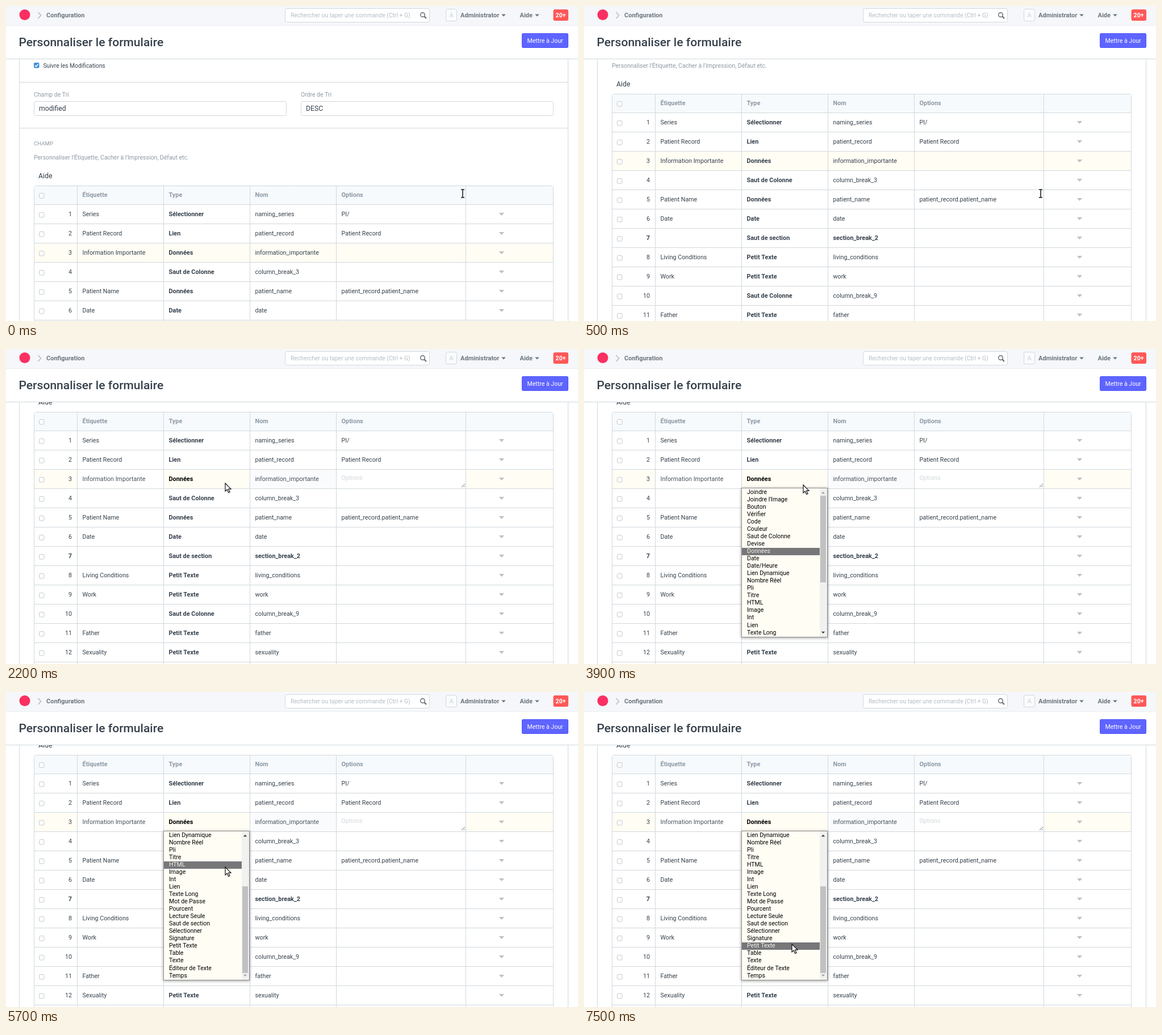
An HTML page with a canvas for the animation above (8000 ms loop, 1007 px wide and 556 px high).

```html
<!DOCTYPE html>
<html lang="fr">
<head>
<meta charset="utf-8">
<title>Personnaliser le formulaire</title>
<style>
html, body { margin: 0; width: 100%; height: 100%; overflow: hidden; background: #fff; }
canvas { display: block; width: 1007px; height: 556px; }
</style>
</head>
<body>
<canvas id="stage" width="1007" height="556"></canvas>
<script>
const ctx = document.getElementById('stage').getContext('2d');
const LOOP = 8000, STEP = 100;
const LINE = '#d1d8dd', MUTED = '#8d99a6', INK = '#36414c', CREAM = '#fffdf4', PALE = '#f7fafc';
const ROW_H = 34, PAGE_SCROLL = 206;
const ITEM_H = 13.05, LIST_TOP = 246.6, VISIBLE = 20;

// label, type, name, options
const rows = [
  ['Series', 'Sélectionner', 'naming_series', 'PI/'],
  ['Patient Record', 'Lien', 'patient_record', 'Patient Record'],
  ['Information Importante', 'Données', 'information_importante', ''],
  ['', 'Saut de Colonne', 'column_break_3', ''],
  ['Patient Name', 'Données', 'patient_name', 'patient_record.patient_name'],
  ['Date', 'Date', 'date', ''],
  ['', 'Saut de section', 'section_break_2', ''],
  ['Living Conditions', 'Petit Texte', 'living_conditions', ''],
  ['Work', 'Petit Texte', 'work', ''],
  ['', 'Saut de Colonne', 'column_break_9', ''],
  ['Father', 'Petit Texte', 'father', ''],
  ['Sexuality', 'Petit Texte', 'sexuality', ''],
  ['', '', '', '']
];
const EDITED = 2, SECTION = 6;
const textX = [134.5, 286.5, 438.5, 590.5];
const dividers = [125, 277, 429, 581, 809];

const items = ['Joindre', "Joindre l'Image", 'Bouton', 'Vérifier', 'Code', 'Couleur',
  'Saut de Colonne', 'Devise', 'Données', 'Date', 'Date/Heure', 'Lien Dynamique', 'Nombre Réel',
  'Pli', 'Titre', 'HTML', 'Image', 'Int', 'Lien', 'Texte Long', 'Mot de Passe', 'Pourcent',
  'Lecture Seule', 'Saut de section', 'Sélectionner', 'Signature', 'Petit Texte', 'Table',
  'Texte', 'Éditeur de Texte', 'Temps'];
const SELECTED = items.indexOf('Données');
const LIST_SCROLL = (items.length - VISIBLE) * ITEM_H;

// time, x, y of the pointer tip
const pointerPath = [
  [900, 804, 328], [1900, 386, 237], [3820, 386, 237], [4500, 386, 309],
  [6300, 386, 309], [7200, 368, 439], [7500, 366, 445]
];

const clamp = v => Math.min(1, Math.max(0, v));
const progress = (t, from, to) => clamp((t - from) / (to - from));
const easeOut = (p, power) => 1 - Math.pow(1 - p, power);
const smooth = p => p * p * (3 - 2 * p);

function rect(x, y, w, h, color) {
  ctx.fillStyle = color;
  ctx.fillRect(x, y, w, h);
}

function box(x, y, w, h, r, fill, stroke) {
  ctx.beginPath();
  ctx.roundRect(x, y, w, h, r);
  if (fill) { ctx.fillStyle = fill; ctx.fill(); }
  if (stroke) { ctx.lineWidth = 1; ctx.strokeStyle = stroke; ctx.stroke(); }
}

function text(str, x, y, size, color, weight = 400, align = 'left') {
  ctx.font = `${weight} ${size}px Roboto, "Noto Sans", sans-serif`;
  ctx.textAlign = align;
  ctx.fillStyle = color;
  ctx.fillText(str, x, y);
}

function polygon(points, fill) {
  ctx.beginPath();
  points.forEach(([x, y]) => ctx.lineTo(x, y));
  ctx.closePath();
  ctx.fillStyle = fill;
  ctx.fill();
}

function polyline(points, color, width) {
  ctx.beginPath();
  points.forEach(([x, y]) => ctx.lineTo(x, y));
  ctx.lineWidth = width;
  ctx.strokeStyle = color;
  ctx.stroke();
}

// A flat triangle; a negative height points up.
function caret(x, y, half, height, color) {
  polygon([[x - half, y - height / 2], [x + half, y - height / 2], [x, y + height / 2]], color);
}

function drawNavbar() {
  rect(0, 0, 1007, 34, '#f5f7fa');
  rect(0, 34, 1007, 1, '#ebeff2');
  ctx.beginPath();
  ctx.arc(33, 15.5, 9.5, 0, Math.PI * 2);
  ctx.fillStyle = '#fb2f62';
  ctx.fill();
  polyline([[56.5, 11], [61.5, 16.5], [56.5, 22]], '#b4bec8', 1.6);
  text('Configuration', 71, 20, 11, '#6c7680', 700);

  box(491.5, 4.5, 254, 24, 3, '#fff', LINE);
  text('Rechercher ou taper une commande (Ctrl + G)', 501, 20, 10.35, '#b5bdc5');
  ctx.beginPath();
  ctx.arc(733.5, 15.5, 3.8, 0, Math.PI * 2);
  ctx.lineWidth = 1.4;
  ctx.strokeStyle = '#5f6972';
  ctx.stroke();
  polyline([[736.2, 18.2], [740, 22]], '#5f6972', 2);

  box(774.5, 5.5, 19, 21, 3, '#fafbfc', LINE);
  text('A', 784, 20, 11, '#c9d1d8', 400, 'center');
  text('Administrator', 800, 20, 11.05, '#6c7680', 700);
  caret(876, 16.5, 3.8, 4, '#6c7680');
  text('Aide', 904.5, 20, 11.05, '#6c7680', 700);
  caret(935, 16.5, 3.8, 4, '#6c7680');
  box(963.5, 6, 26.5, 20, 3, '#ff5858');
  text('20+', 976.5, 20, 10.5, '#fff', 700, 'center');
}

function drawPageHead() {
  rect(0, 35, 1007, 58, '#fff');
  rect(0, 93, 1007, 1, LINE);
  text('Personnaliser le formulaire', 22.5, 70.5, 21.05, INK, 500);
  box(908, 48, 82, 26, 3, '#5e64ff');
  box(908.5, 48.5, 81, 25, 3, null, '#5057ff');
  text('Mettre à Jour', 949, 65, 10.6, '#fff', 400, 'center');
}

function checkbox(y) {
  box(58.5, y - 4.5, 8.5, 8.5, 2, '#fff', '#c3c8cc');
}

function drawEditedCells(top) {
  [[125, 277, '#fff'], [429, 581, '#fafbfc'], [581, 809, '#fff']].forEach(([left, right, color]) =>
    rect(left + 1, top + 1, right - left - 1, ROW_H - 1, color));
  polyline([[802, top + 32], [808, top + 26]], '#777', 1);
  polyline([[805.5, top + 32], [808, top + 29.5]], '#777', 1);
}

function drawRow(row, i, editing) {
  const top = 350 + i * ROW_H, base = top + 21;
  const active = editing && i === EDITED;
  const weight = i === SECTION ? 700 : 400;
  const size = i === SECTION ? 10.9 : 10.7;
  if (i === EDITED) rect(50, top + 1, 913, ROW_H - 1, CREAM);
  if (active) drawEditedCells(top);
  rect(50, top, 913, 1, LINE);
  checkbox(top + 19);
  text(i + 1, 116, base, size, INK, weight, 'right');
  row.forEach((cell, col) => {
    if (col === 1) text(cell, textX[col], base, 10.9, active ? '#000' : INK, 700);
    else text(cell, textX[col], base, size, active ? '#47525d' : INK, weight);
  });
  if (active) text('Options', textX[3], base - 2, 10.7, '#d1d8dd');
  caret(872.5, top + 17.5, 4.7, 5, '#bcc0c4');
}

function drawTable(editing) {
  box(49.5, 317.5, 914, 600, 3, '#fff', LINE);
  rect(50, 318, 913, 32, PALE);
  checkbox(335);
  ['Étiquette', 'Type', 'Nom', 'Options'].forEach((label, i) =>
    text(label, textX[i], 337, 10.9, MUTED, 700));
  rows.forEach((row, i) => drawRow(row, i, editing));
  dividers.forEach(x => rect(x, 318, 1, 600, LINE));
}

function drawForm(scroll, editing) {
  ctx.save();
  ctx.beginPath();
  ctx.rect(0, 94, 1007, 462);
  ctx.clip();
  rect(23, 94, 1, 462, LINE);
  rect(989, 94, 1, 462, LINE);
  ctx.translate(0, -scroll);

  box(49, 100, 9.5, 9.5, 2, '#3b8fdd');
  polyline([[51, 104.8], [53, 107], [56.5, 102.5]], '#fff', 1.5);
  text('Suivre les Modifications', 65.5, 109, 10.3, INK);
  rect(24, 134, 965, 1, LINE);
  [[49, 'Champ de Tri', 'modified'], [519, 'Ordre de Tri', 'DESC']].forEach(([x, label, value]) => {
    text(label, x, 160, 10.45, MUTED);
    box(x + 0.5, 168.5, 444, 25, 3, '#fff', LINE);
    text(value, x + 9, 185, 12.2, INK);
  });
  rect(24, 215, 965, 1, LINE);
  text('CHAMP', 49, 246, 9.65, MUTED);
  text("Personnaliser l'Étiquette, Cacher à l'Impression, Défaut etc.", 49, 271, 10.48, MUTED);
  text('Aide', 57, 304, 12.4, INK);
  drawTable(editing);
  ctx.restore();
}

function drawDropdown(scroll, active, alpha) {
  ctx.save();
  ctx.globalAlpha = alpha;
  ctx.shadowColor = 'rgba(0,0,0,.4)';
  ctx.shadowBlur = 5;
  ctx.shadowOffsetY = 1;
  rect(277, 245, 152, 264, '#909090');
  ctx.shadowColor = 'transparent';
  rect(278, 246, 150, 262, CREAM);

  ctx.save();
  ctx.beginPath();
  ctx.rect(278, 246, 137, 262);
  ctx.clip();
  items.forEach((item, i) => {
    const y = LIST_TOP + i * ITEM_H - scroll;
    if (i === active) rect(278, Math.round(y), 137, 13, '#77777a');
    text(item, 287, Math.round(y + 9), 10.5, i === active ? '#f2f0e8' : '#000');
  });
  ctx.restore();

  rect(415, 246, 13, 262, '#f1f1f0');
  rect(416, Math.round(259 + scroll * 0.582), 10, 153, '#c1c1c1');
  caret(421, 253.5, 3.2, -3.5, scroll > 0 ? '#404040' : '#a3a3a3');
  caret(421, 500.5, 3.2, 3.5, scroll < LIST_SCROLL ? '#404040' : '#a3a3a3');
  ctx.restore();
}

function pointerAt(t) {
  const last = pointerPath[pointerPath.length - 1];
  const next = pointerPath.findIndex(p => p[0] > t);
  if (next < 0) return last.slice(1);
  if (next === 0) return pointerPath[0].slice(1);
  const [t0, x0, y0] = pointerPath[next - 1], [t1, x1, y1] = pointerPath[next];
  const p = smooth(progress(t, t0, t1));
  return [Math.round(x0 + (x1 - x0) * p), Math.round(y0 + (y1 - y0) * p)];
}

function drawArrow(x, y) {
  const shape = [[0, 0], [0, 14], [3.3, 11], [5.6, 16.5], [8, 15.5], [5.7, 10.2], [10, 10.2]]
    .map(([dx, dy]) => [x + dx, y + dy]);
  polygon(shape, '#fff');
  ctx.lineWidth = 1.2;
  ctx.strokeStyle = '#111';
  ctx.stroke();
}

function drawTextCursor(x, y) {
  [['#fff', 3.6], ['#111', 1.5]].forEach(([color, width]) => {
    polyline([[x, y - 6.5], [x, y + 6.5]], color, width);
    [-7, 7].forEach(dy => polyline([[x - 3, y + dy], [x + 3, y + dy]], color, width));
  });
}

function activeItem(t, y) {
  const scroll = t >= 5700 ? LIST_SCROLL : 0;
  const index = Math.floor((y - LIST_TOP + scroll) / ITEM_H);
  return index < 0 ? SELECTED : index;
}

function draw(t) {
  const pageScroll = Math.round(PAGE_SCROLL * easeOut(progress(t, 0, 900), 1.9));
  const listScroll = LIST_SCROLL * easeOut(progress(t, 4700, 5600), 1.2);
  const [x, y] = pointerAt(t);
  rect(0, 0, 1007, 556, '#fff');
  drawForm(pageScroll, t >= 2200);
  drawNavbar();
  drawPageHead();
  if (t >= 3000) drawDropdown(listScroll, activeItem(t, y), t < 3100 ? 0.5 : 1);
  if (t < 1000) drawTextCursor(804, 331);
  else drawArrow(x, y);
}

const start = performance.now();
function frame() {
  const t = (performance.now() - start) % LOOP;
  draw(Math.floor(t / STEP) * STEP);
  requestAnimationFrame(frame);
}
frame();
</script>
</body>
</html>
```
